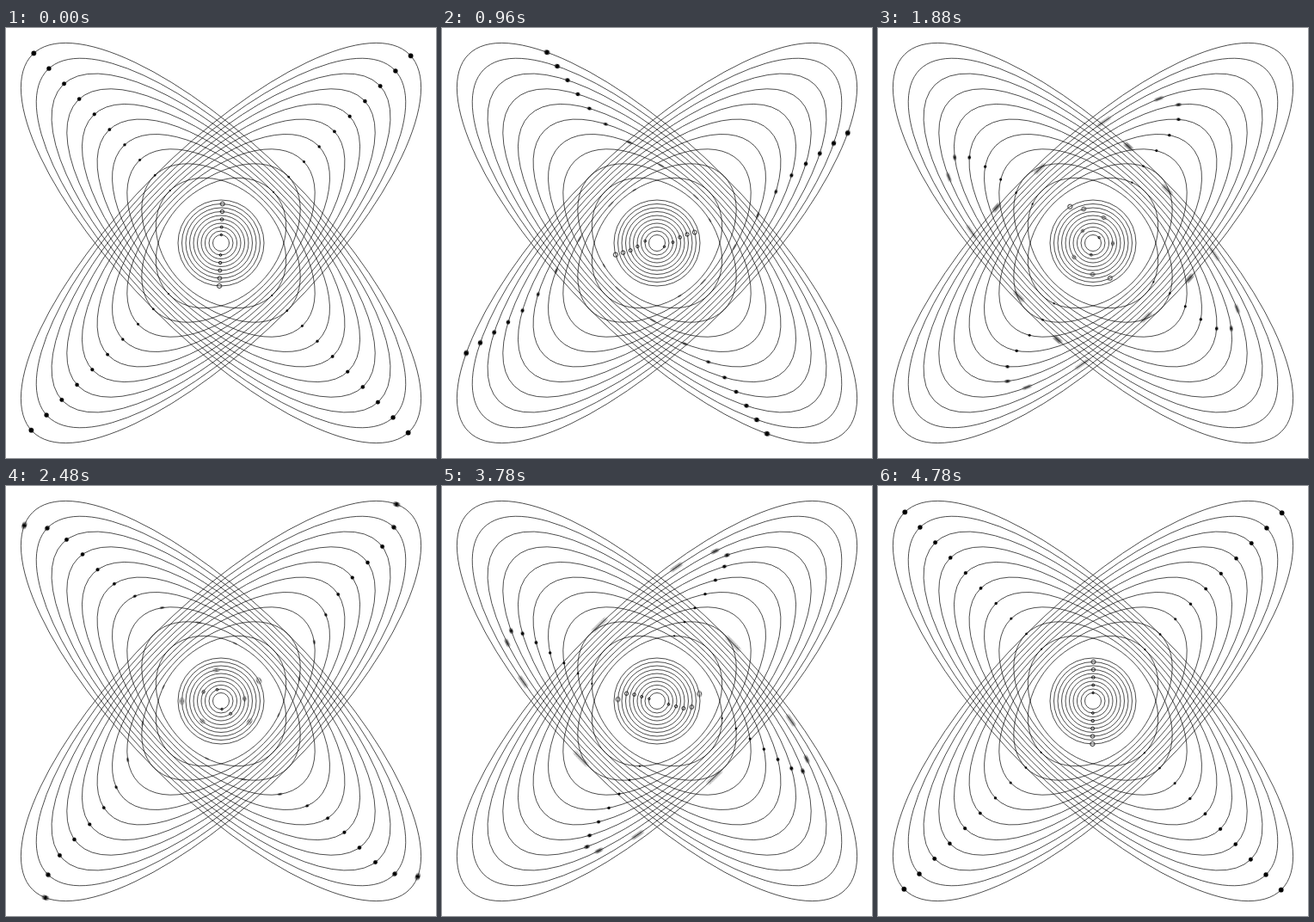
An HTML page with a canvas that plays this animation: 500x500 px, repeating every 4.8 s.

```html
<!DOCTYPE html>
<html lang="en">
<head>
<meta charset="utf-8">
<title>Orbits</title>
<style>
  html, body { margin: 0; width: 100%; height: 100%; overflow: hidden; background: #fff; }
  canvas { position: absolute; left: 0; top: 0; }
</style>
</head>
<body>
<canvas id="tracks" width="500" height="500"></canvas>
<canvas id="dots" width="500" height="500"></canvas>
<script>
const TAU = 2 * Math.PI;
const LOOP = 4800, STEP = 20, STAGGER = 160, TURN = 1600;
const SAMPLES = 8, SHUTTER = 18;
const TILTS = [-TAU / 8, TAU / 8];

const lines = document.getElementById('tracks').getContext('2d');
const dots = document.getElementById('dots').getContext('2d');

// Index 0 is the innermost orbit.
const rings = Array.from({ length: 10 }, (_, i) => ({
  delay: i * STAGGER,
  a: 85 + 25 * i,
  b: 65 + 5 * i,
  dot: 1.1 + 1.75 * i / 9,
  core: 9.5 + 4.5 * i,
  bead: 1.2 + 1.4 * i / 9,
  side: i % 2 ? TAU / 4 : -TAU / 4
}));

const ease = x => {
  x = Math.min(1, Math.max(0, x));
  return x < 0.5 ? 4 * x ** 3 : 1 - 4 * (1 - x) ** 3;
};

function drawTracks() {
  lines.lineWidth = 0.7;
  for (const r of rings) {
    for (const tilt of TILTS) {
      lines.beginPath();
      lines.ellipse(250, 250, r.a, r.b, tilt, 0, TAU);
      lines.stroke();
    }
    lines.beginPath();
    lines.arc(250, 250, r.core, 0, TAU);
    lines.stroke();
  }
}

function disc(x, y, radius) {
  dots.beginPath();
  dots.arc(250 + x, 250 + y, radius, 0, TAU);
}

function drawDots(t) {
  const base = t / LOOP;
  for (const r of rings) {
    const since = t - r.delay;
    const quarter = ease(since / TURN) + ease(since / TURN - 1);
    const angle = base * TAU / 2 + quarter * TAU / 4;
    const u = r.a * Math.cos(angle), v = r.b * Math.sin(angle);
    for (const tilt of TILTS) {
      const c = Math.cos(tilt), s = Math.sin(tilt);
      const x = u * c - v * s, y = u * s + v * c;
      disc(x, y, r.dot);
      dots.fill();
      disc(-x, -y, r.dot);
      dots.fill();
    }
    const spin = r.side + TAU * (base + ease(since / (2 * TURN)));
    disc(r.core * Math.cos(spin), r.core * Math.sin(spin), r.bead);
    dots.stroke();
  }
}

function render(now) {
  const t = Math.floor(now / STEP) * STEP + STEP;
  dots.clearRect(0, 0, 500, 500);
  for (let k = 0; k < SAMPLES; k++) {
    drawDots((t + SHUTTER * k / (SAMPLES - 1)) % LOOP);
  }
}

drawTracks();
// Adding faint samples gives the motion blur.
dots.globalCompositeOperation = 'lighter';
dots.globalAlpha = 1 / SAMPLES;
dots.lineWidth = 0.75;

const start = performance.now();
function tick() {
  render(performance.now() - start);
  requestAnimationFrame(tick);
}
tick();
</script>
</body>
</html>
```
